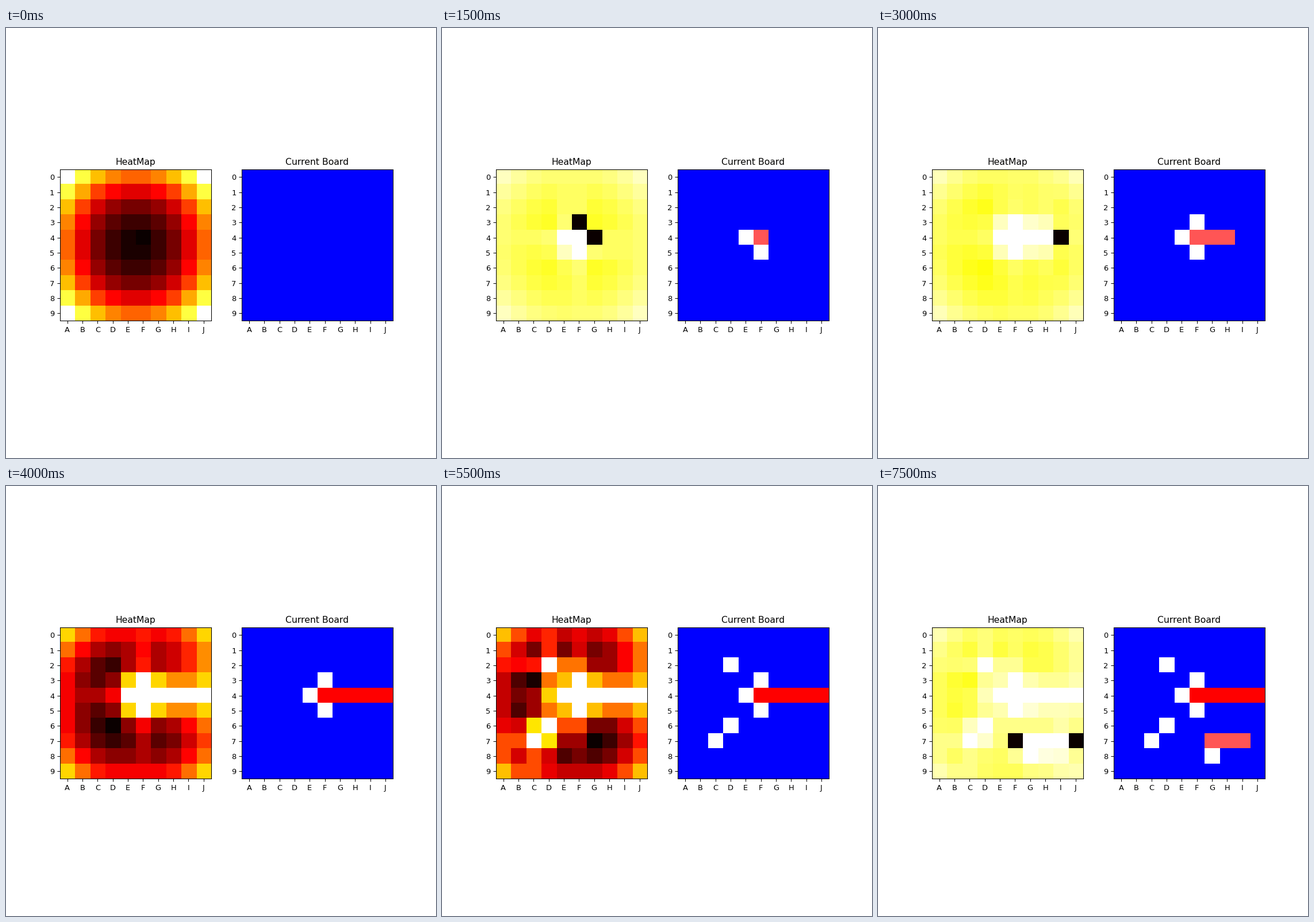
Write a matplotlib script that moves like this. It is 748 px wide and 748 px high and loops after 8000 ms.

```python
import numpy as np
import matplotlib.pyplot as plt
from matplotlib.animation import FuncAnimation

N = 10
COLS = "ABCDEFGHIJ"
SHOTS = "F4* F5 E4 F3 G4* H4* I4* J4* D6 D2 C7 G7* G8 H7* I7*".split()
SHIPS = [5, 4, 3, 3, 2]
SUNK_AFTER = 8  # the five-cell ship goes down with this shot

SEA, MISS, HIT, SUNK = (0, 0, 255), (255, 255, 255), (255, 85, 85), (255, 0, 0)


def cell(name):
    return int(name[1]), COLS.index(name[0])


def density(free, ships):
    """Chance of each cell being covered, summed over the ships."""
    heat = np.zeros((N, N))
    for size in ships:
        cover, total = np.zeros((N, N)), 0
        for grid, out in ((free, cover), (free.T, cover.T)):
            for r in range(N):
                for c in range(N - size + 1):
                    if grid[r, c:c + size].all():
                        out[r, c:c + size] += 1
                        total += 1
        heat += cover / total
    return heat


def chase(hits, free):
    """Free cells worth trying around the open hits."""
    steps = [(0, 1), (0, -1), (1, 0), (-1, 0)]
    if len(hits) > 1:
        steps = steps[:2] if hits[0][0] == hits[1][0] else steps[2:]
    near = {(r + dr, c + dc) for r, c in hits for dr, dc in steps}
    return [(r, c) for r, c in near
            if 0 <= r < N and 0 <= c < N and free[r, c]]


def state(turn):
    board = np.full((N, N, 3), SEA, dtype=np.uint8)
    free = np.ones((N, N), dtype=bool)
    hits = []
    for i, shot in enumerate(SHOTS[:turn], 1):
        pos = cell(shot)
        free[pos] = False
        board[pos] = MISS
        if shot.endswith("*"):
            hits.append(pos)
            board[pos] = HIT
        if i == SUNK_AFTER:
            for h in hits:
                board[h] = SUNK
            hits = []

    heat = density(free, SHIPS[1:] if turn >= SUNK_AFTER else SHIPS)
    if hits:
        for pos in chase(hits, free):
            heat[pos] += 1
    else:
        # the next shot goes to the hottest cell, so let it win ties
        heat[cell(SHOTS[turn])] = heat.max() * 1.02
    return heat, board


STATES = [state(t) for t in range(len(SHOTS) + 1)]

fig, axes = plt.subplots(1, 2, figsize=(8, 8), dpi=93.5)
heat_im = axes[0].imshow(STATES[0][0], cmap="hot_r")
board_im = axes[1].imshow(STATES[0][1])
for ax, title in zip(axes, ("HeatMap", "Current Board")):
    ax.set_title(title)
    ax.set_xticks(range(N), COLS)
    ax.set_yticks(range(N))


def update(turn):
    heat, board = STATES[turn]
    heat_im.set_data(heat)
    heat_im.set_clim(heat.min(), heat.max())
    board_im.set_data(board)
    return heat_im, board_im


anim = FuncAnimation(fig, update, frames=len(STATES), interval=500,
                     repeat=True, repeat_delay=0)
plt.show()
```
